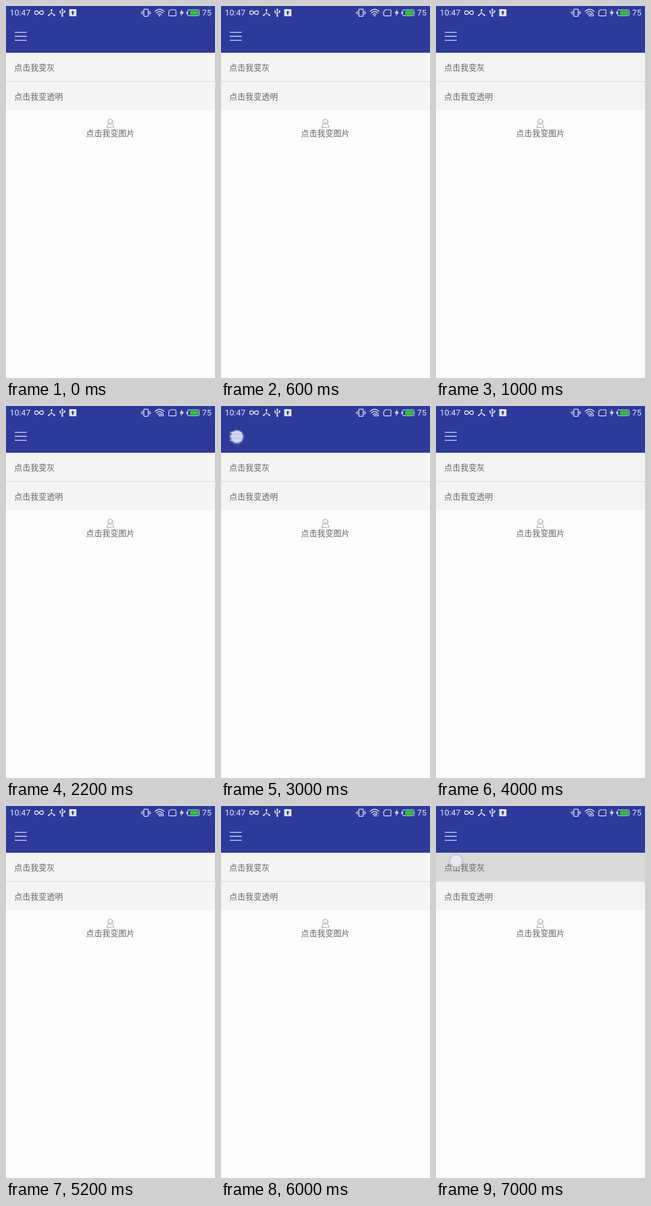
Animation of 332 by 589 pixels, one loop 8000 ms. Source, as an HTML page:

```html
<!DOCTYPE html>
<html lang="zh-CN">
<head>
<meta charset="utf-8">
<title>List taps</title>
<style>
  html, body { margin: 0; width: 100%; height: 100%; overflow: hidden; background: #fcfcfc; }
  svg { display: block; width: 332px; height: 589px; }
  .label { font: 12.9px "Noto Sans CJK SC", "Noto Sans CJK", "Noto Sans", sans-serif; fill: #666; }
  .status { font: 13.2px Roboto, sans-serif; fill: #e6e8f5; }
  .line { fill: none; stroke: #e6e8f5; stroke-width: 1.2; stroke-linecap: round; stroke-linejoin: round; }
  .solid { fill: #e6e8f5; }
  .step { opacity: 0; animation: 8s step-end infinite; }
  .arrow-up { animation-name: arrow-up; }
  .arrow-down { animation-name: arrow-down; }
  .menu-tap { animation-name: menu-tap; }
  .row-tap { animation-name: row-tap; }
  @keyframes arrow-up { 0% { opacity: 0 } 12.5%, 100% { opacity: 1 } }
  @keyframes arrow-down { 0% { opacity: 0 } 12.5% { opacity: 1 } 75% { opacity: .35 } 87.5%, 100% { opacity: 1 } }
  @keyframes menu-tap { 0% { opacity: 0 } 37.5% { opacity: 1 } 50%, 100% { opacity: 0 } }
  @keyframes row-tap { 0% { opacity: 0 } 87.5%, 100% { opacity: 1 } }
</style>
</head>
<body>
<svg viewBox="0 0 332 589">
  <defs>
    <radialGradient id="glow">
      <stop offset=".7" stop-color="#c3c8ee" stop-opacity=".6"/>
      <stop offset="1" stop-color="#8f98d8" stop-opacity="0"/>
    </radialGradient>
    <radialGradient id="halo">
      <stop offset=".75" stop-color="#a9aed2" stop-opacity=".75"/>
      <stop offset="1" stop-color="#b9bdd6" stop-opacity="0"/>
    </radialGradient>
  </defs>

  <rect width="332" height="589" fill="#fcfcfc"/>
  <rect y="74" width="332" height="91" fill="#f4f4f4"/>
  <rect y="119" width="332" height="1" fill="#d9d9d9"/>
  <rect class="step row-tap" y="74" width="332" height="46" fill="#d9d9d9"/>
  <rect width="332" height="74" fill="#2c3a9c"/>

  <!-- status bar, left -->
  <text class="status" x="6" y="15">10:47</text>
  <g class="line">
    <path d="M52.5 10.5C50.5 8 49.8 7.5 48.6 7.5a3 3 0 0 0 0 6C49.8 13.5 50.5 13 52.5 10.5S55.2 7.5 56.4 7.5a3 3 0 0 1 0 6C55.2 13.5 54.5 13 52.5 10.5Z" stroke-width="1.3"/>
    <path d="M72.3 6V11L68 14.5M72.3 11L76.7 14.5"/>
    <path d="M89.5 6V15M89.5 13L86 11V8.5M89.5 11.5L93 10V8"/>
  </g>
  <g class="solid">
    <circle cx="72.3" cy="6.3" r="1.4"/>
    <circle cx="68" cy="14.6" r="1.4"/>
    <circle cx="76.8" cy="14.6" r="1.4"/>
    <path d="M89.5 3.5L91.4 6.8H87.6Z"/>
    <circle cx="89.5" cy="15.6" r="1.6"/>
    <circle cx="86" cy="8.6" r="1.3"/>
    <rect x="91.8" y="7" width="2.4" height="2.4"/>
    <rect x="100.5" y="5" width="11.3" height="11.3" rx=".6"/>
  </g>
  <path d="M106.1 7.2L109.2 10.6H107.2V14H105V10.6H103Z" fill="#2c3a9c"/>

  <!-- status bar, right -->
  <g class="line">
    <rect x="219" y="5.2" width="6.8" height="11.2" rx=".8"/>
    <path d="M217 8V13.6M215 9.5V12M227.8 8V13.6M229.6 9.5V12" stroke-width="1"/>
    <path d="M236.8 8.4Q244 2.2 251.2 8.4M239 11Q244 6.8 249 11M241.3 13.4Q244 11.2 246.7 13.4" stroke-width="1.3"/>
    <path d="M261.2 6H268.5Q270 6 270 7.5V14.2Q270 15.7 268.5 15.7H260Q258.5 15.7 258.5 14.2V8.8Z"/>
    <rect x="288.6" y="6.2" width="18.2" height="9.2" rx="1.2" stroke-width="1"/>
  </g>
  <circle class="solid" cx="244" cy="15.4" r="1.2"/>
  <g fill="#e6e8f5" stroke="#2c3a9c" stroke-width="1" paint-order="stroke">
    <path class="step arrow-up" d="M246.5 11L248.1 13.4H247V17H246V13.4H244.9Z"/>
    <path class="step arrow-down" d="M249.4 17.2L247.8 14.6H248.9V11H249.9V14.6H251Z"/>
  </g>
  <path class="solid" d="M280.3 5L275.8 11.4H278.8L277.6 16.6L282.6 9.6H279.4Z"/>
  <rect class="solid" x="286.6" y="8.8" width="1.6" height="4"/>
  <rect x="292.4" y="7.6" width="13" height="6.4" fill="#1fd018"/>
  <text class="status" x="311.5" y="15">75</text>

  <!-- menu button -->
  <circle class="step menu-tap" cx="25" cy="49" r="13" fill="url(#glow)"/>
  <path d="M14 41.6H33M14 48H33M14 54.4H33" fill="none" stroke="#d6d9ee" stroke-width="1.3"/>
  <circle class="step menu-tap" cx="25.4" cy="48.6" r="9.6" fill="#e3e5f5" fill-opacity=".72"/>

  <text class="label" x="13" y="101.7">点击我变灰</text>
  <text class="label" x="13" y="147.7">点击我变透明</text>
  <text class="label" x="127" y="206.2">点击我变图片</text>

  <g fill="none" stroke="#858585" stroke-width=".8" stroke-linecap="round">
    <circle cx="165.8" cy="183.2" r="4.1"/>
    <path d="M163.2 186.5Q160.2 188.5 160.2 192.2H167.5M168.4 186.5Q171.3 188.5 171.4 192.2H169.5M164.2 185Q165.8 186.3 167.4 185M164.2 182.2V182.5M167.4 182.2V182.5"/>
  </g>

  <g class="step row-tap">
    <circle cx="32" cy="86.8" r="12.5" fill="url(#halo)" opacity=".65"/>
    <circle cx="32" cy="86.8" r="9.8" fill="#f0f0f3" fill-opacity=".85" stroke="#b4b8d4" stroke-width=".9"/>
  </g>
</svg>
</body>
</html>
```
